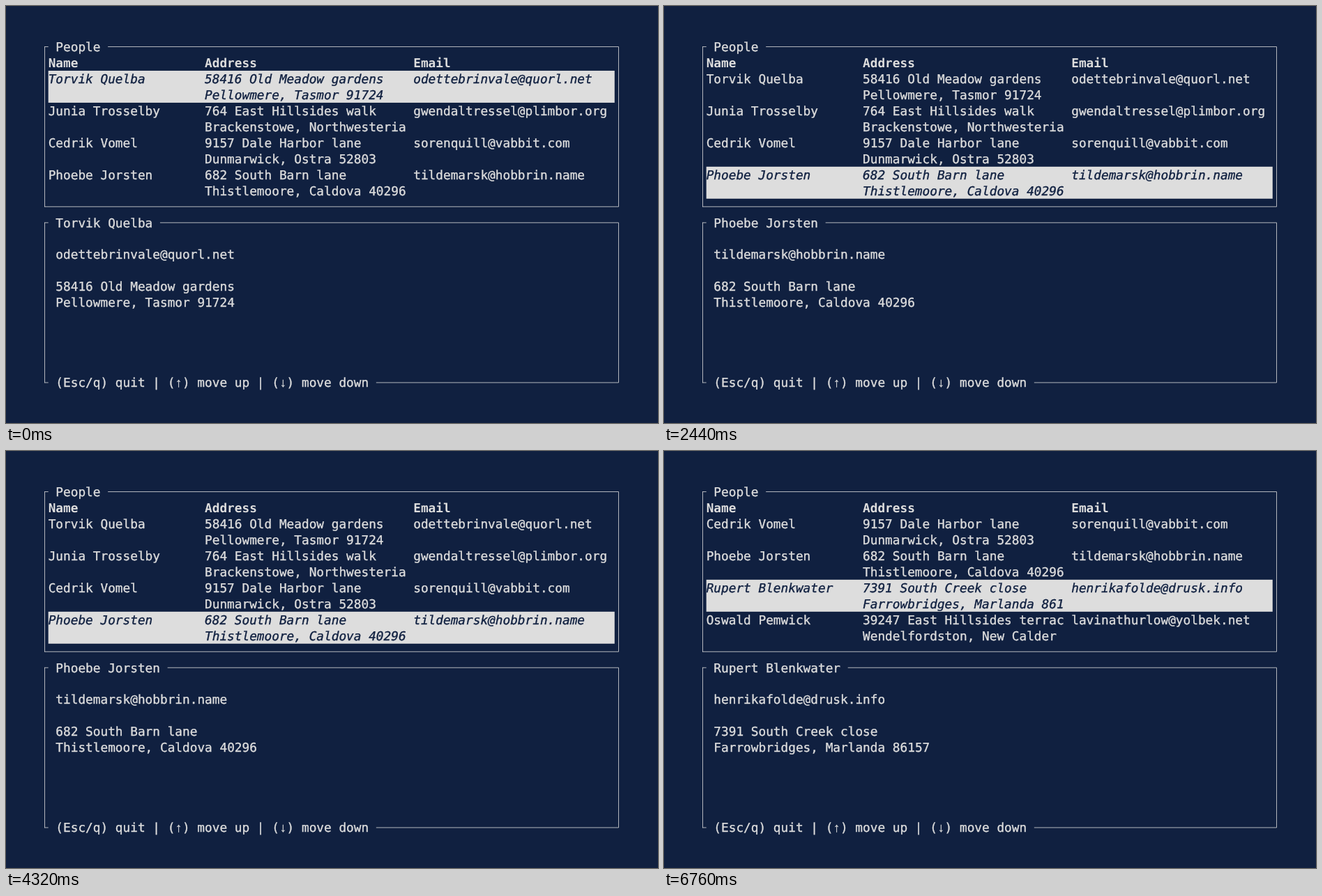
An HTML page for the animation above (8000 ms loop, 935 by 599 pixels).

```html
<!DOCTYPE html>
<html lang="en">
<head>
<meta charset="utf-8">
<title>People</title>
<style>
  html, body { margin: 0; width: 100%; height: 100%; overflow: hidden; background: #102040; }
  svg { display: block; }
  text {
    font: 17.75px "DejaVu Sans Mono", monospace; text-rendering: geometricPrecision;
    fill: #ddd; stroke: #ddd; stroke-width: .35px;
  }
  .bold { font-weight: bold; stroke: none; }
  .arrow { font-family: "Noto Sans Mono", monospace; }
  .selected text { font-style: italic; fill: #102040; stroke: #102040; }
  rect { fill: #ddd; }
  path { fill: none; stroke: #ddd; stroke-opacity: .8; }
</style>
</head>
<body>
<svg id="screen" width="935" height="599"></svg>
<script>
const CELL = 10.685, LINE = 22.975, LOOP = 8000;
const VISIBLE = 4, ADDRESS_WIDTH = 27;
const COLUMNS = [1, 22, 50];
const HELP = "(Esc/q) quit | (↑) move up | (↓) move down";

// name, street, city, email
const people = [
  ["Torvik Quelba", "58416 Old Meadow gardens", "Pellowmere, Tasmor 91724", "odettebrinvale@quorl.net"],
  ["Junia Trosselby", "764 East Hillsides walk", "Brackenstowe, Northwesteria 30582", "gwendaltressel@plimbor.org"],
  ["Cedrik Vomel", "9157 Dale Harbor lane", "Dunmarwick, Ostra 52803", "sorenquill@vabbit.com"],
  ["Phoebe Jorsten", "682 South Barn lane", "Thistlemoore, Caldova 40296", "tildemarsk@hobbrin.name"],
  ["Rupert Blenkwater", "7391 South Creek close", "Farrowbridges, Marlanda 86157", "henrikafolde@drusk.info"],
  ["Oswald Pemwick", "39247 East Hillsides terrace", "Wendelfordston, New Calder 17935", "lavinathurlow@yolbek.net"],
];

// start time in ms, selected person
const steps = [[0, 0], [1200, 1], [1840, 2], [2440, 3], [3080, 2], [4320, 3], [4920, 4], [5560, 5], [6760, 4]];

const colX = col => 50 + col * CELL;
const rowY = row => 58.5 + row * LINE;
const text = (col, row, string, style = "") =>
  `<text class="${style}" x="${colX(col)}" y="${rowY(row) + 6.3}">${
    string.replace(/[↑↓]/g, '<tspan class="arrow">$&</tspan>')}</text>`;

// A frame whose top and bottom edges break around an optional label
function panel(top, bottom, title, footer) {
  const left = 55.5, right = 878.5;
  const edge = (row, label) => label
    ? `M${left} ${rowY(row)}H${colX(1)}M${colX(label.length + 3)} ${rowY(row)}H${right}`
    : `M${left} ${rowY(row)}H${right}`;
  return `<path d="${edge(top, title)}V${rowY(bottom)}${edge(bottom, footer)}M${left} ${rowY(top) - .5}V${rowY(bottom) + .5}"/>`
    + text(2, top, title) + (footer ? text(2, bottom, footer) : "");
}

function tableRow([name, street, city, email], index, selected) {
  const row = 2 + index * 2;
  const bar = selected
    ? `<rect x="${colX(1)}" y="${rowY(row - .5)}" width="${76 * CELL}" height="${2 * LINE}"/>` : "";
  return `<g class="${selected ? "selected" : ""}">` + bar
    + text(COLUMNS[0], row, name)
    + text(COLUMNS[1], row, street.slice(0, ADDRESS_WIDTH))
    + text(COLUMNS[1], row + 1, city.slice(0, ADDRESS_WIDTH))
    + text(COLUMNS[2], row, email) + "</g>";
}

function render(step) {
  const selected = steps[step][1];
  const furthest = Math.max(...steps.slice(0, step + 1).map(s => s[1]));
  const offset = Math.max(0, furthest - VISIBLE + 1);
  const [name, street, city, email] = people[selected];
  screenSvg.innerHTML = panel(0, 10, "People")
    + ["Name", "Address", "Email"].map((label, i) => text(COLUMNS[i], 1, label, "bold")).join("")
    + people.slice(offset, offset + VISIBLE).map((p, i) => tableRow(p, i, i + offset === selected)).join("")
    + panel(11, 21, name, HELP)
    + text(2, 13, email) + text(2, 15, street) + text(2, 16, city);
}

const screenSvg = document.getElementById("screen");
const start = performance.now();
let shown = -1;

function tick() {
  const time = (performance.now() - start) % LOOP;
  const step = steps.filter(([at]) => at <= time).length - 1;
  if (step !== shown) render(shown = step);
  requestAnimationFrame(tick);
}
tick();
</script>
</body>
</html>
```
